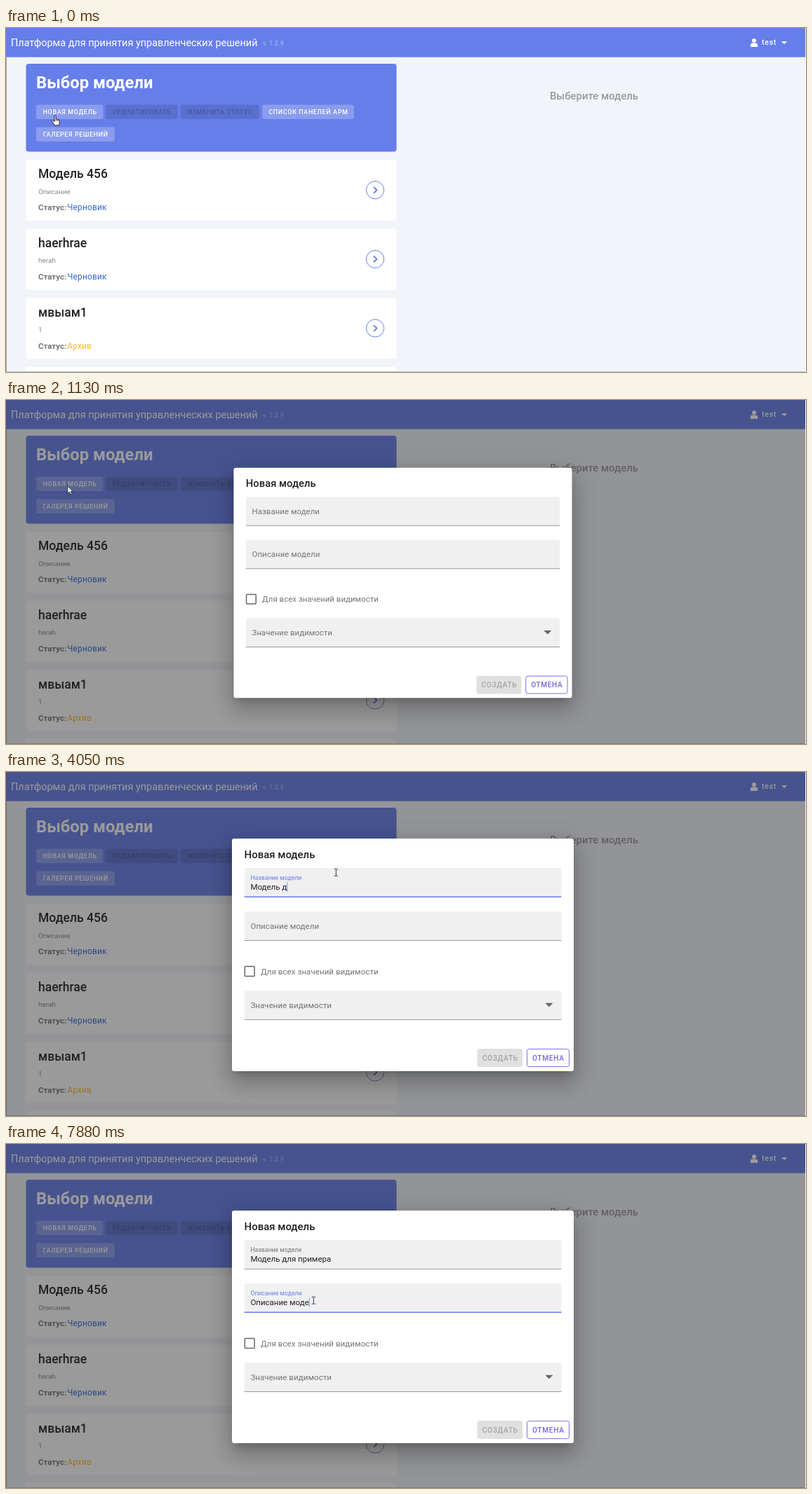
These frames come from a looping animation (1140 px wide and 491 px high, 8 s). An HTML page:

```html
<!DOCTYPE html>
<html lang="ru">
<head>
<meta charset="utf-8">
<title>Выбор модели</title>
<style>
  html, body { margin: 0; width: 100%; height: 100%; overflow: hidden; background: #f1f4f9; }
  #stage { position: relative; width: 1140px; height: 491px; overflow: hidden; }
  #stage > * { position: absolute; left: 0; top: 0; }
  svg { display: block; }
  text { font-family: Roboto, "Noto Sans", sans-serif; white-space: pre; }
  #dim { width: 1140px; height: 491px; background: #212121; }
  #stage > #dialog {
    left: 322px; top: 95px; width: 487px; height: 332px;
    background: #fff; border-radius: 3px;
    box-shadow: 0 8px 11px -5px rgba(0,0,0,.2), 0 18px 28px 2px rgba(0,0,0,.14), 0 7px 34px 6px rgba(0,0,0,.12);
  }
</style>
</head>
<body>
<div id="stage">
  <svg id="page" width="1140" height="491" viewBox="0 0 1140 491"></svg>
  <div id="dim"></div>
  <div id="dialog"><svg id="form" width="487" height="332" viewBox="322 95 487 332"></svg></div>
  <svg id="top" width="1140" height="491" viewBox="0 0 1140 491">
    <rect x="1139" width="1" height="491" fill="#fff"/>
    <g id="hand"><path d="M-1.3 .9Q-1.3 0 -.3 0Q.8 0 .8 1V5.2L1.6 4.9Q2.5 4.8 2.7 5.6Q4.2 5 4.5 6.2Q6 5.8 6 7.3V10Q6 11.4 5 12.4V14H-1.6V12.6L-4.8 8.6Q-5.4 7.5 -4.6 7Q-3.8 6.6 -3 7.4L-1.3 8.9Z" fill="#fff" stroke="#111" stroke-width=".9"/>
      <path d="M.8 5.2V8M2.7 5.8V8.2M4.5 6.4V8.5" stroke="#111" stroke-width=".7"/></g>
    <path id="arrow" d="M0 0V10.2L2.3 8.1L4 11.8L5.7 11L4.1 7.5H7.2Z" fill="#fff" stroke="#222" stroke-width=".7"/>
    <path id="beam" d="M-2.6 -5H-.8L0 -4.4L.8 -5H2.6M0 -4.4V4.4M-2.6 5H-.8L0 4.4L.8 5H2.6" fill="none" stroke="#222" stroke-width=".9"/>
  </svg>
</div>
<script>
const $ = id => document.getElementById(id);
const LOOP = 8000, UNIT = 0.742, BLUE = '#667eea';

// Sizes and letter spacing are in CSS pixels of a page shown at UNIT scale.
function text(x, y, str, size, fill, { weight = 400, gap = 0, anchor = 'start', id = '' } = {}) {
  return `<text ${id && `id="${id}"`} x="${x}" y="${y}" font-size="${size * UNIT}" font-weight="${weight}"
    letter-spacing="${gap * UNIT}" text-anchor="${anchor}" fill="${fill}">${str}</text>`;
}
function rect(x, y, w, h, fill, r = 0, extra = '') {
  return `<rect x="${x}" y="${y}" width="${w}" height="${h}" rx="${r}" fill="${fill}" ${extra}/>`;
}

function pageButton(x, y, w, label, disabled) {
  return rect(x, y, w, 20.6, disabled ? 'rgba(0,0,0,.12)' : 'rgba(255,255,255,.23)', 3) +
    text(x + w / 2 + .4, y + 13.5, label, 12, disabled ? 'rgba(0,0,0,.22)' : '#fff',
      { weight: 500, gap: .9, anchor: 'middle' });
}

function card(i, title, note, status, color) {
  const y = 188 + i * 98.6;
  return rect(28.5, y, 528, 87.2, '#fff', 3) +
    text(46, y + 26.3, title, 23.6, '#212121', { weight: 500 }) +
    text(46, y + 48.8, note, 13.4, '#868686') +
    text(46, y + 72.4, 'Статус:', 15.5, '#757575', { weight: 700 }) +
    text(87.2, y + 72.4, status, 16, color, { gap: .3 }) +
    `<g fill="none" stroke="${BLUE}"><circle cx="526" cy="${y + 43.3}" r="12.6"/>
     <path d="M523.9 ${y + 38.9}l4.5 4.4l-4.5 4.4" stroke-width="1.9"/></g>`;
}

$('page').innerHTML =
  rect(0, 0, 1140, 491, '#f1f4f9') +
  rect(0, 0, 1139, 41.6, BLUE) +
  text(7, 25.6, 'Платформа для принятия управленческих решений', 19.45, '#fff') +
  text(366, 25, 'v. 1.2.9', 12, 'rgba(255,255,255,.5)', { gap: .3 }) +
  `<circle cx="1066" cy="18" r="3" fill="#fff"/>
   <path d="M1060.8 27V24.7Q1060.8 21.6 1064 21.6H1068Q1071.2 21.6 1071.2 24.7V27Z" fill="#fff"/>
   <path d="M1105 18.9H1113.2L1109.1 23.3Z" fill="#fff"/>` +
  text(1077, 24.3, 'test', 14, '#fff', { weight: 500, gap: 1.1 }) +
  rect(28.5, 51, 528, 125.6, BLUE, 4) +
  text(43, 86.3, 'Выбор модели', 32, '#fff', { weight: 700 }) +
  pageButton(43, 109.4, 95.5, '') +
  `<clipPath id="clip">${rect(43, 109.4, 95.5, 20.6, '#fff', 3)}</clipPath>
   <g clip-path="url(#clip)"><circle id="ripple" fill="#fff" fill-opacity=".38"/></g>` +
  text(91.2, 122.9, 'НОВАЯ МОДЕЛЬ', 12, '#fff', { weight: 500, gap: .9, anchor: 'middle' }) +
  pageButton(142.5, 109.4, 102, 'РЕДАКТИРОВАТЬ', true) +
  pageButton(248.8, 109.4, 111.8, 'ИЗМЕНИТЬ СТАТУС', true) +
  pageButton(365, 109.4, 131, 'СПИСОК ПАНЕЛЕЙ АРМ') +
  pageButton(43, 141.4, 111.8, 'ГАЛЕРЕЯ РЕШЕНИЙ') +
  text(775, 102.3, 'Выберите модель', 20, '#999', { weight: 500 }) +
  card(0, 'Модель 456', 'Описание', 'Черновик', '#3269d6') +
  card(1, 'haerhrae', 'herah', 'Черновик', '#3269d6') +
  card(2, 'мвыам1', '1', 'Архив', '#fbb92b') +
  rect(28.5, 484, 528, 20, '#fff', 3) +
  rect(0, 42, 1, 449, '#9b9da1') +
  rect(0, 490, 1140, 1, '#c2c5ca');

function fieldBox(y, line = '') {
  return `<path d="M339.6 ${y + 41.5}V${y + 3}q0-3 3-3H788.4q3 0 3 3V${y + 41.5}Z" fill="#f0f0f0"/>` +
    rect(339.6, y + 41, 451.8, 1, '#999', 0, line && `id="${line}"`);
}
function fieldLabel(x, y, str) {
  return text(x, y, str, 15.5, 'currentColor', { gap: .1 });
}
function field(id, y, label) {
  return fieldBox(y, id + 'Line') +
    `<g id="${id}Label">${fieldLabel(0, 0, label)}</g>` +
    text(348.4, y + 31.3, '', 15.5, '#212121', { id: id + 'Text' }) +
    rect(0, y + 20.5, .8, 13.5, BLUE, 0, `id="${id}Caret"`);
}

$('form').style.color = '#737373';
$('form').innerHTML =
  text(339.6, 122.7, 'Новая модель', 20, '#212121', { weight: 500, gap: .05 }) +
  field('name', 137, 'Название модели') +
  field('note', 199, 'Описание модели') +
  rect(340.3, 277.6, 13.8, 13.8, 'none', 1, 'stroke="#666" stroke-width="1.5"') +
  fieldLabel(363, 288.7, 'Для всех значений видимости') +
  fieldBox(312) +
  fieldLabel(348.4, 336.5, 'Значение видимости') +
  '<path d="M768.4 329.8H779.4L773.9 335.3Z" fill="#666"/>' +
  rect(671.5, 395, 64.6, 26, '#e0e0e0', 3) +
  text(704.3, 411.9, 'СОЗДАТЬ', 13.8, '#a5a5a5', { weight: 500, gap: .9, anchor: 'middle' }) +
  rect(742.5, 395.4, 60, 25.2, '#fff', 3, 'stroke="#7b70e6"') +
  text(772.9, 411.9, 'ОТМЕНА', 13.8, '#7566e0', { weight: 500, gap: .9, anchor: 'middle' });

// Each row: start time, then the values held until the next row.
const CURSOR = [
  [0, 'hand', 70.3, 125], [990, 'arrow', 70, 125], [1130, 'arrow', 88, 123],
  [1260, 'arrow', 196, 129], [1400, 'beam', 352, 141], [1550, 'beam', 455, 143.5],
  [1700, 'beam', 470.3, 143.5], [5410, 'beam', 470.3, 145.3], [5530, 'beam', 468, 153],
  [5660, 'beam', 460, 170], [5800, 'arrow', 448, 188], [5950, 'beam', 440, 216],
  [6100, 'beam', 438.3, 223.3]
];
const RIPPLE = [[0, 71, 130, 0], [710, 74, 127, 28], [830, 80, 122, 53], [990, 91, 120, 80], [1130, 0, 0, 0]];
const DIALOG = [[0, 0, .7, 0], [990, .25, .76, .52], [1130, .45, .99, 1], [1260, .45, 1, 1]];

// focus: label lift and active flag; keys: number of typed letters; caret: visibility.
const FIELDS = [
  { id: 'name', y: 137, value: 'Модель для примера',
    focus: [[0, 0, 0], [1850, .5, 1], [1980, 1, 1], [6100, 1, 0]],
    keys: [[0, 0], [2530, 1], [2670, 2], [2960, 3], [3080, 4], [3210, 5], [3350, 6],
      [3790, 7], [3920, 8], [4060, 10], [4200, 12], [4330, 14], [4460, 15], [4730, 17], [4850, 18]],
    caret: [[0, 0], [2100, 1], [5410, 0]] },
  { id: 'note', y: 199, value: 'Описание модели',
    focus: [[0, 0, 0], [6100, .5, 1], [6290, 1, 1]],
    keys: [[0, 0], [6450, 1], [6600, 2], [6740, 3], [6890, 4], [7030, 5], [7180, 6],
      [7320, 7], [7460, 8], [7600, 10], [7720, 11], [7880, 13]],
    caret: [[0, 0], [6290, 1]] }
];

function at(rows, t) {
  let row = rows[0];
  for (const r of rows) if (r[0] <= t) row = r;
  return row.slice(1);
}

function set(el, attrs) {
  for (const [k, v] of Object.entries(attrs)) el.setAttribute(k, v);
}

function drawField({ id, y, value, focus, keys, caret }, t) {
  const [lift, active] = at(focus, t);
  const label = $(id + 'Label'), typed = $(id + 'Text');
  set(label, { transform: `translate(348.4 ${y + 24.9 - 8.1 * lift}) scale(${1 - .25 * lift})` });
  label.style.color = active ? BLUE : '';
  set($(id + 'Line'), active
    ? { y: y + 40.5, height: 1.5, fill: BLUE }
    : { y: y + 41, height: 1, fill: '#999' });
  const str = value.slice(0, at(keys, t)[0]);
  if (typed.textContent !== str) typed.textContent = str;
  set($(id + 'Caret'), {
    x: 348.4 + (str ? typed.getComputedTextLength() : 0),
    opacity: at(caret, t)[0]
  });
}

function draw(t) {
  const [kind, x, y] = at(CURSOR, t);
  for (const id of ['hand', 'arrow', 'beam']) $(id).style.display = id === kind ? '' : 'none';
  set($(kind), { transform: `translate(${x} ${y})` });

  const [cx, cy, r] = at(RIPPLE, t);
  set($('ripple'), { cx, cy, r });

  const [dim, scale, opacity] = at(DIALOG, t);
  $('dim').style.opacity = dim;
  $('dialog').style.opacity = opacity;
  $('dialog').style.transform = scale === 1 ? 'none' : `scale(${scale})`;
  FIELDS.forEach(f => drawField(f, t));
}

const start = performance.now();
function tick() {
  draw((performance.now() - start) % LOOP);
  requestAnimationFrame(tick);
}
tick();
</script>
</body>
</html>
```
